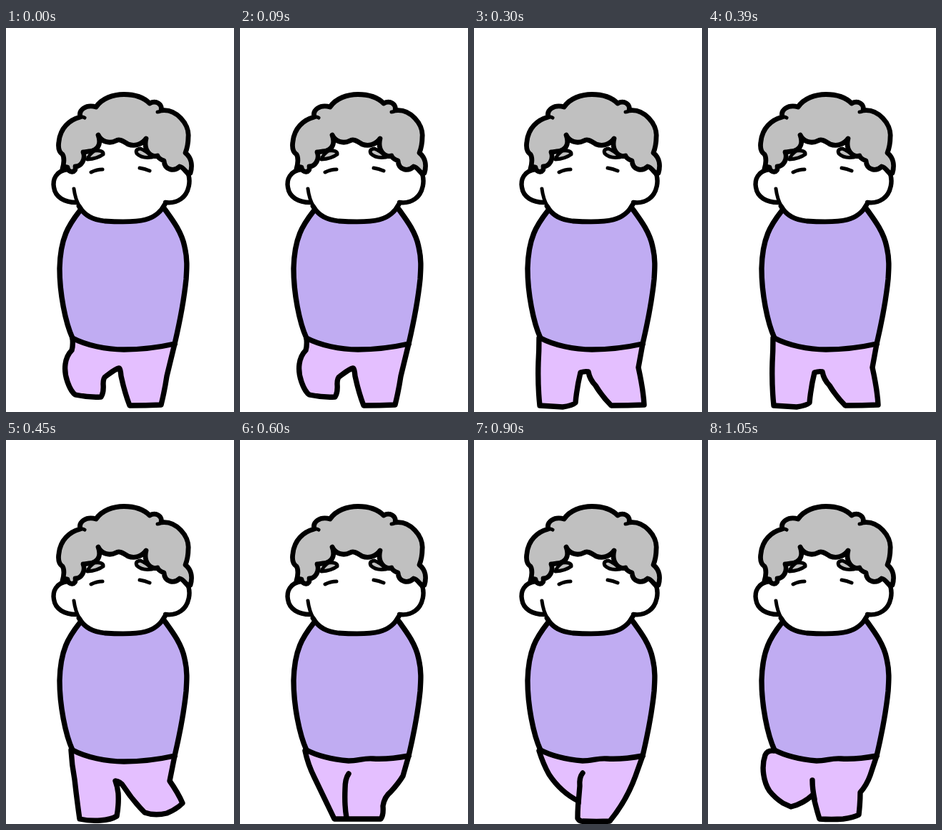
Recreate the animation shown at these times as an HTML page. Size 319 by 535 pixels, loop 1200 ms.

```html
<!DOCTYPE html>
<html lang="en">
<head>
<meta charset="utf-8">
<title>Walking in place</title>
<style>
  html, body { margin: 0; width: 100%; height: 100%; overflow: hidden; background: #fff; }
  svg { display: block; width: 100vw; height: 100vh; }
  path { stroke: #000; stroke-width: 7.4; stroke-linecap: round; stroke-linejoin: round; fill: none; }
  .legs path { fill: #e4bfff; }
  .legs .line { fill: none; }
  .shirt { fill: #c0acf2; stroke: none; }
  .skin { fill: #fff; stroke: none; }
  .ear { fill: #fff; stroke-width: 6.4; }
  .chin { stroke-width: 6.8; }
  .hair { fill: #c0c0c0; stroke-width: 6.8; }
  .thin { stroke-width: 5; }
  .brow { fill: #c0c0c0; stroke-width: 5; }
</style>
</head>
<body>
<svg viewBox="0 0 319 535">
  <g id="poses"></g>

  <path id="shirt" class="shirt"/>
  <path d="M103 255C88 274 76 292 75 335C75 370 83 410 93 432"/>
  <path d="M221 251C232 266 246 284 250 305C254 322 253 335 252 350C249 380 243 410 236 440"/>
  <path id="hem"/>

  <path class="skin" d="M90 190L96 230Q104 250 115 262Q130 270 163 270Q200 270 222 246L250 200L190 150H130Z"/>
  <path class="ear" d="M86 197C70 199 65 211 67 222C69 236 82 243 98 243"/>
  <path class="ear" d="M253 199C260 212 256 230 245 238C238 243 230 244 223 243"/>
  <path class="chin" d="M102 248C110 262 122 267 138 269C155 270 180 271 195 267C207 264 217 256 222 246"/>
  <path class="thin" d="M95 224C96 232 99 242 103 249"/>

  <path class="hair" d="M79 196C81 190 82 180 79 176C73 172 73 164 74 158C76 140 88 128 104 124C101 114 112 106 126 110C134 98 150 92.500 165 92.500C180 92.500 192 96 201 105C210 100 219 106 217 115C238 112 257 134 255 152C255 160 254 166 251 174C260 181 261 192 258 202C253 206 250 194 243 193C236 200 222 199 221 185C216 183 213 181 212 178C202 181 192 170 196 154C190 163 179 165 171 162C163 157 158 154 154 157C144 162 133 158 129 149C133 160 130 168 121 171C115 172 111 173 108 173C112 183 105 193 97 193C99 202 87 203 86 194Q82 193 79 196Z"/>
  <path class="thin" d="M103 124Q107 123 110 125M217 115Q215 117 212 117"/>

  <path class="brow" d="M114 183Q116 176 124 171Q137 170 136 176Q128 182 114 183Z"/>
  <path class="brow" d="M204 180Q198 172 188 168Q180 169 183 175Q190 182 204 180Z"/>
  <path class="thin" d="M119 201Q127 197 135 197M187 195Q194 196 201 199"/>
</svg>
<script>
const LOOP = 1200;
const WIDE = "M93 432C112 442 140 448 165 448C195 448 218 444 236 440";
const NARROW = "M93 432C110 441 130 445 152 447C166 447 172 443 186 444C204 445 220 443 236 440";
const SIDES = "C243 410 249 380 252 350C253 335 254 322 250 305C246 284 232 266 221 251H103C88 274 76 292 75 335C75 370 83 410 93 432Z";

// Each step: start time, hem, leg outline, optional loose line
const steps = [
  [0, WIDE, "M93 432Q94 443 92 449C82 459 80 476 86 493Q91 507 97 511Q115 515 133 514Q137 508 136 496Q136 487 140 485C148 479 153 475 158 474Q160 474 161 485Q166 508 173 526Q196 526 217 525Q222 505 225 485L236 440"],
  [150, WIDE, "M93 432Q94 443 91 448C80 464 74 473 74 489Q75 508 81 517Q102 519 122 518Q124 516 124 507C128 492 142 478 160 475Q165 476 167 486Q171 504 181 525Q205 526 229 524Q228 512 227 500Q227 482 230 470L236 440"],
  [300, WIDE, "M91 432Q91 450 90 466Q89 498 92 526Q108 527 124 528Q138 526 142 522Q144 500 149 480Q155 478 160 479Q162 490 170 498Q179 513 192 526Q216 526 238 525Q237 505 230 473L236 440"],
  [450, WIDE, "M91 432Q92 452 96 473Q99 500 103 528Q117 531 132 530Q147 529 155 524Q158 508 157 492Q156 483 153 475Q160 476 164 482Q177 502 194 519Q208 524 225 520Q238 515 247 506Q241 492 229 475L236 440"],
  [600, NARROW, "M91 433Q95 452 104 470L132 528H197Q201 523 200 510Q202 497 211 490Q222 478 228 468L236 440",
    "M152 465Q147 472 147 486Q146 510 149 526"],
  [900, NARROW, "M91 433Q97 452 105 466C115 481 130 495 146 503Q145 516 145 527Q148 532 153 531Q171 532 190 531C204 514 218 490 226 468L236 440",
    "M152 464Q147 470 148 482L146 506"],
  [1050, NARROW, "M92 433Q83 432 80 439C74 456 78 477 86 489Q94 499 105 506L116 511Q133 507 147 494Q151 512 156 528Q173 529 189 528Q204 526 211 522Q213 505 213 491Q222 481 227 467L236 440",
    "M146 474Q146 486 149 500"],
];

const poses = document.getElementById("poses");
const hem = document.getElementById("hem");
const shirt = document.getElementById("shirt");

function addPath(parent, d, cls) {
  const p = document.createElementNS("http://www.w3.org/2000/svg", "path");
  p.setAttribute("d", d);
  if (cls) p.setAttribute("class", cls);
  parent.append(p);
}

const groups = steps.map(([, , outline, line]) => {
  const g = document.createElementNS("http://www.w3.org/2000/svg", "g");
  g.setAttribute("class", "legs");
  addPath(g, outline);
  if (line) addPath(g, line, "line");
  poses.append(g);
  return g;
});

let shown = -1;
function draw(now) {
  const t = now % LOOP;
  const i = steps.findLastIndex(s => s[0] <= t);
  if (i !== shown) {
    groups.forEach((g, k) => g.style.display = k === i ? "" : "none");
    hem.setAttribute("d", steps[i][1]);
    shirt.setAttribute("d", steps[i][1] + SIDES);
    shown = i;
  }
}

const start = performance.now();
function tick() {
  draw(performance.now() - start);
  requestAnimationFrame(tick);
}
tick();
</script>
</body>
</html>
```
